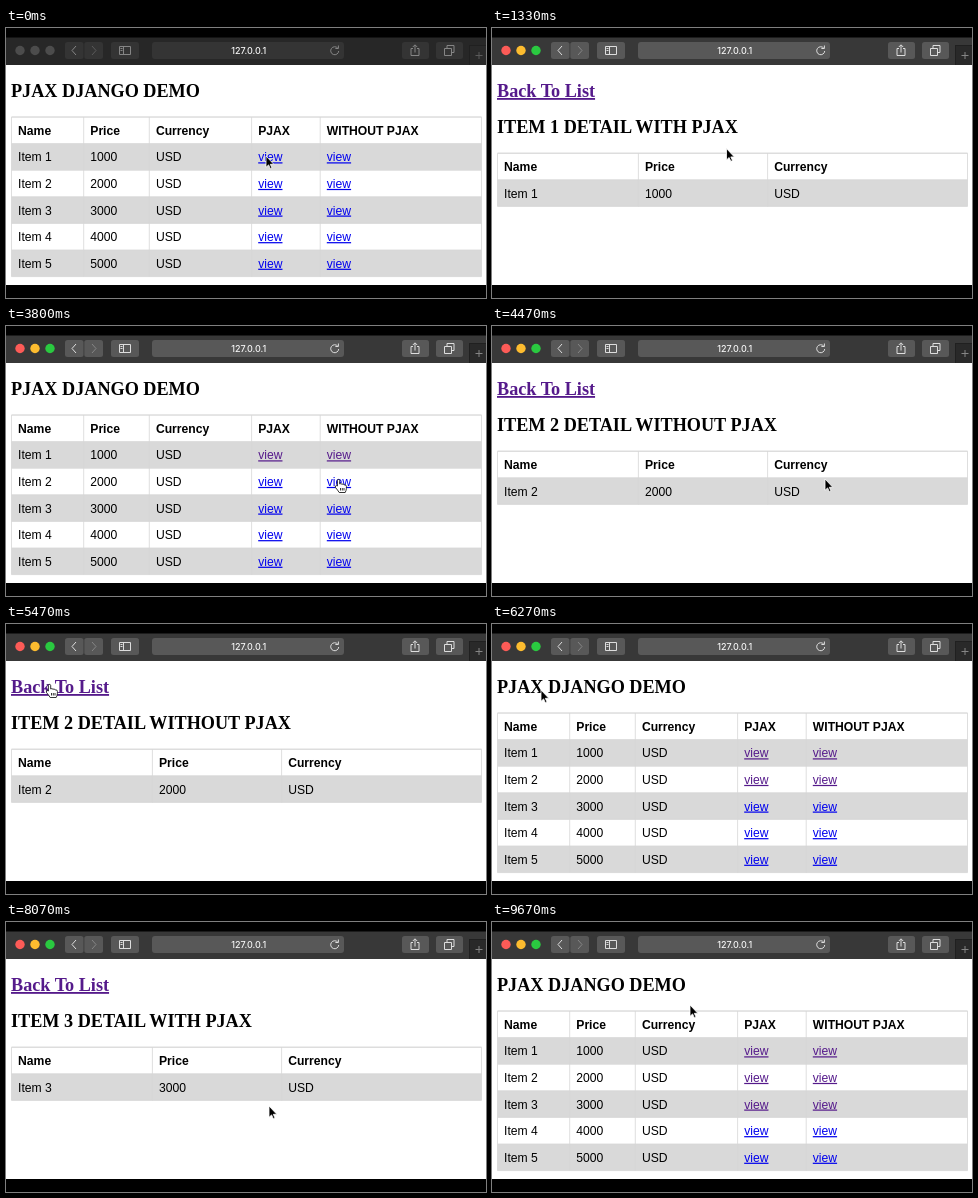
These frames come from a looping animation (480x270 px, 9.74 s). An HTML page:

```html
<!DOCTYPE html>
<html lang="en">
<head>
<meta charset="utf-8">
<title>PJAX Django demo</title>
<style>
  html, body { margin: 0; height: 100%; overflow: hidden; background: #000; }
  svg { display: block; width: 100vw; height: 100vh; }
  text { font: 12.15px "Liberation Sans", Arial, sans-serif; }
  .th { font-weight: bold; }
  .h { font: bold 18.2px "Liberation Serif", Times, serif; }
  .link { fill: #00e; text-decoration: underline; }
  .seen { fill: #551a8b; }
  .url { font: 500 9px Inter, "Liberation Sans", sans-serif; fill: #f4f4f4; text-anchor: middle; }
  .bg { fill: #383838; }
  .btn { fill: #585858; }
  .ico { fill: none; stroke: #ddd; stroke-width: 1; }
  .dim { stroke: #858585; }
  .tab { fill: #292929; stroke: #202020; }
  .idle .bg { fill: #272727; }
  .idle .btn { fill: #343434; }
  .idle .ico { stroke: #858585; }
  .idle .dim { stroke: #5a5a5a; }
  .idle circle { fill: #4c4c4c; }
</style>
</head>
<body>
<svg viewBox="0 0 480 270">
  <rect width="480" height="270"/>
  <g id="bar">
    <rect class="bg" y="9.5" width="480" height="28"/>
    <circle cx="14" cy="22.5" r="4.7" fill="#fc5b57"/>
    <circle cx="29" cy="22.5" r="4.7" fill="#fdbc2f"/>
    <circle cx="44" cy="22.5" r="4.7" fill="#2ac940"/>
    <g class="btn">
      <rect x="59" y="14" width="18.5" height="17" rx="2.5"/>
      <rect x="78.3" y="14" width="18.7" height="17" rx="2.5"/>
      <rect x="105" y="14" width="28" height="17" rx="2.5"/>
      <rect x="146" y="14" width="192" height="17" rx="3"/>
      <rect x="396" y="14" width="27" height="17" rx="2.5"/>
      <rect x="430" y="14" width="27" height="17" rx="2.5"/>
    </g>
    <path class="ico" d="M70 18l-4 4.5 4 4.5"/>
    <path class="ico dim" d="M86 18l4 4.5-4 4.5"/>
    <path class="ico" d="M113.5 18.5h11v8h-11zM117.5 18.5v8M114.5 20.5h2M114.5 22.5h2"/>
    <path class="ico" d="M331.8 20.2a4 4 0 1 0 .9 2.8M332.4 17.5v3h-3"/>
    <path class="ico" d="M407 20.5h-2v7h8v-7h-2M409 24.5v-7.5M406.8 19l2.2-2.2 2.2 2.2"/>
    <path class="ico" d="M441 20v-2.500h7v7h-2.500M438.500 20.500h7v7h-7z"/>
    <rect class="tab" x="463.500" y="17.500" width="18" height="20"/>
    <path class="ico dim" d="M473 24v7M469.500 27.500h7"/>
    <text class="url" x="242.700" y="26">127.0.0.1</text>
  </g>
  <rect y="37" width="480" height="220" fill="#fff"/>
  <g id="page"></g>
  <g id="mouse">
    <path id="arrow" d="M0 0V11.300L2.600 8.900 4.300 12.700 6 12 4.300 8.300H7.800Z" stroke="#fff" stroke-width=".8"/>
    <path id="hand" d="M-1.600 7V1.600Q-1.600.4-.5.4T.7 1.600V5Q1.800 4.200 3 5.200 4.200 4.600 5.200 5.800 7.200 5.400 7.400 7.400V9.500Q7.200 11.500 6.200 13.500H.2Q-1.200 11.200-3.600 8.400-4 6.600-2.600 6.600ZM1.500 9v2.500M3.300 9v2.500M5 9v2.500" fill="#fff" stroke="#000" stroke-width=".8"/>
  </g>
</svg>
<script>
const $ = id => document.getElementById(id);
const LOOP = 9740, TICK = 1000 / 15, ROW = 26.6;

const text = (x, y, s, cls = '') => `<text x="${x}" y="${y}" class="${cls}">${s}</text>`;

// edges: left edge of each column; rows[0] is the header
function table(top, edges, rows) {
  const bottom = top + rows.length * ROW;
  let out = '', lines = `M5.500 ${top}H475.500V${bottom}H5.500Z`;
  rows.forEach((cells, r) => {
    const y = top + r * ROW;
    if (r % 2) out += `<rect x="5.500" y="${y}" width="470" height="${ROW}" fill="#d9d9d9"/>`;
    lines += `M5.500 ${y}H475.500`;
    cells.forEach(([s, cls = r ? '' : 'th'], c) => {
      out += text(edges[c] + 6.600, y + 17.700, s, cls);
    });
  });
  for (const x of edges.slice(1)) lines += `M${x} ${top}V${bottom}`;
  return out.replace(/^/, '') + `<path d="${lines}" fill="none" stroke="#d6d6d6" stroke-width=".8"/>`;
}

const head = names => names.map(s => [s]);

function list(seen) {
  const rows = [head(['Name', 'Price', 'Currency', 'PJAX', 'WITHOUT PJAX'])];
  for (let i = 1; i <= 5; i++) {
    const view = ['view', i <= seen ? 'link seen' : 'link'];
    rows.push([[`Item ${i}`], [i * 1000], ['USD'], view, view]);
  }
  return text(5, 69, 'PJAX DJANGO DEMO', 'h') + table(89, [5.500, 77.700, 143.300, 245.600, 314.200], rows);
}

function detail(i, mode) {
  return text(5, 69, 'Back To List', 'h link seen') +
    text(5, 105.300, `ITEM ${i} DETAIL ${mode} PJAX`, 'h') +
    table(125.200, [5.500, 146.400, 275.600], [
      head(['Name', 'Price', 'Currency']),
      [[`Item ${i}`], [i * 1000], ['USD']]
    ]);
}

// [start tick, is list, markup]
const scenes = [
  [0, true, list(0)], [11, false, detail(1, 'WITH')],
  [36, true, list(1)], [64, false, detail(2, 'WITHOUT')],
  [93, true, list(2)], [121, false, detail(3, 'WITH')],
  [141, true, list(3)]
];

// pointer: [tick, x, y]
const path = [
  [0, 260, 128], [19, 260, 128], [24, 15, 57], [27, 77, 62],
  [43, 77, 62], [51, 361, 201], [57, 333, 153],
  [73, 333, 153], [79, 22, 28], [82, 44, 60], [88, 49, 66],
  [102, 49, 66], [106, 335, 181], [109, 342, 201], [115, 263, 184],
  [127, 263, 184], [132, 57, 62], [134, 69, 64],
  [136, 69, 64], [138, 75, 68], [141, 75, 68], [145, 198, 83], [147, 198, 83]
];

function pointer(n) {
  const k = path.findIndex(p => p[0] > n);
  const [t0, x0, y0] = path[k - 1], [t1, x1, y1] = path[k];
  const u = (n - t0) / (t1 - t0), e = u * u * (3 - 2 * u);
  return [x0 + (x1 - x0) * e, y0 + (y1 - y0) * e];
}

function overLink(isList, x, y) {
  if (!isList) return x > 5 && x < 104 && y > 53 && y < 75;
  const inColumn = (x > 252 && x < 277) || (x > 320 && x < 346);
  const offset = (y - 89) / ROW;
  return inColumn && offset > 1 && offset < 6 && Math.abs(offset % 1 - .5) < .28;
}

let shown;
function draw(now) {
  const n = Math.floor((now % LOOP + 5) / TICK);
  const scene = scenes.filter(s => s[0] <= n).pop();
  if (scene !== shown) $('page').innerHTML = (shown = scene)[2];
  $('bar').setAttribute('class', n < 1 ? 'idle' : '');
  const [x, y] = pointer(n);
  const hand = n > 1 && overLink(scene[1], x, y);
  $('mouse').setAttribute('transform', `translate(${x} ${y})`);
  $('hand').style.display = hand ? '' : 'none';
  $('arrow').style.display = hand ? 'none' : '';
}

const start = performance.now();
function loop() {
  draw(performance.now() - start);
  requestAnimationFrame(loop);
}
loop();
</script>
</body>
</html>
```
